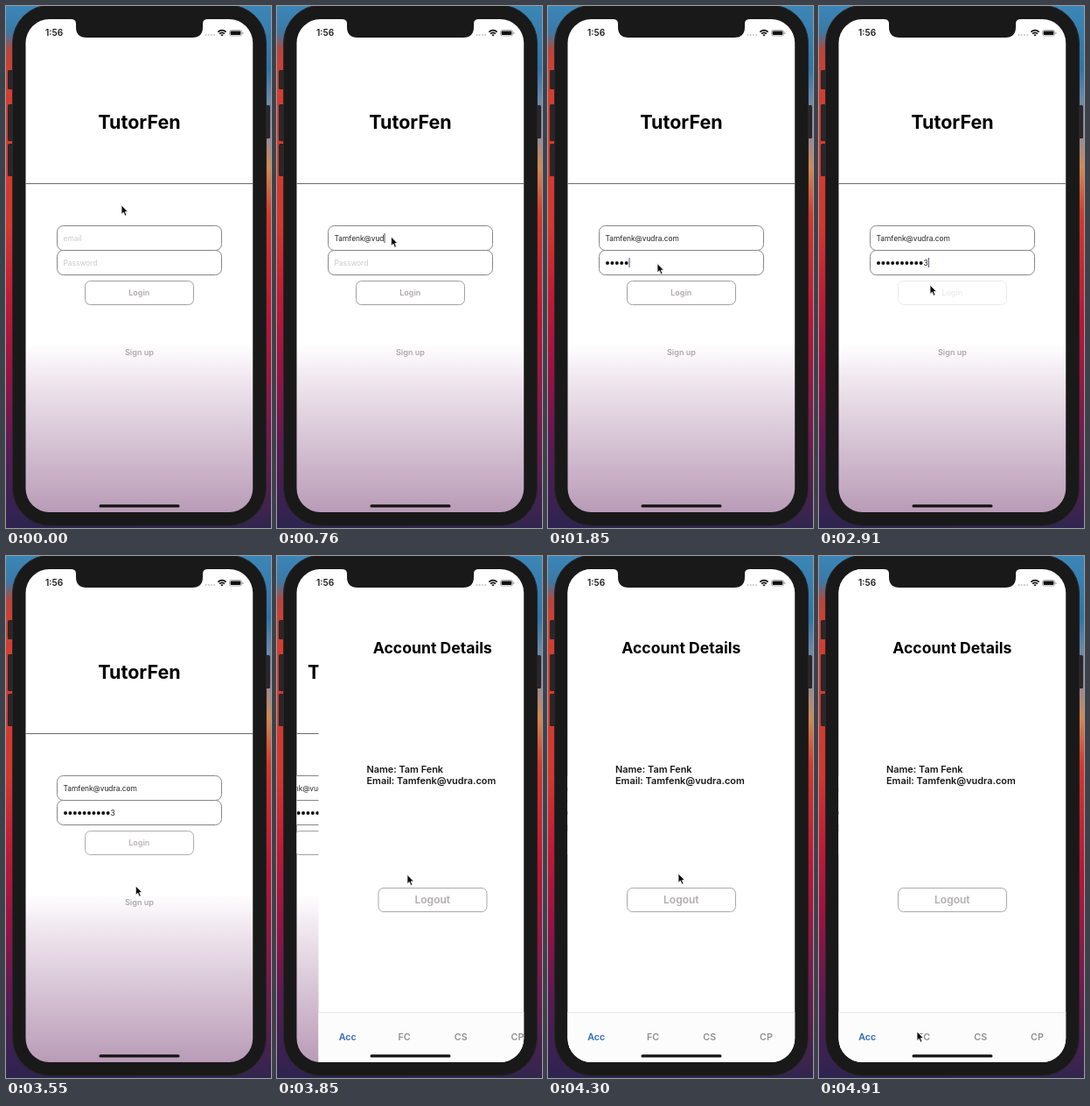
Write an HTML page that moves like this. It is 303x595 px and loops after 4940 ms.

```html
<!DOCTYPE html>
<html lang="en">
<head>
<meta charset="utf-8">
<title>Login demo</title>
<style>
  html, body { margin: 0; width: 100%; height: 100%; overflow: hidden; background: #191919; }
  svg { display: block; width: 100vw; height: 100vh; font-family: Inter, "Liberation Sans", sans-serif; }
  .b { font-weight: 700; }
  .s { font-weight: 600; }
  .mid { text-anchor: middle; }
  .box { fill: #fff; stroke: #868686; stroke-width: 1; }
  .field { font-size: 8.4px; fill: #222; }
  .hint { font-size: 8.4px; fill: #cbc9cb; }
</style>
</head>
<body>
<svg viewBox="0 0 303 595" preserveAspectRatio="none">
  <defs>
    <linearGradient id="wallL" x2="0" y2="1">
      <stop offset="0" stop-color="#3b86b8"/>
      <stop offset=".05" stop-color="#3a79a6"/>
      <stop offset=".085" stop-color="#b8453c"/>
      <stop offset=".13" stop-color="#d23f30"/>
      <stop offset=".42" stop-color="#d4372e"/>
      <stop offset=".56" stop-color="#c01a36"/>
      <stop offset=".7" stop-color="#9a1243"/>
      <stop offset=".85" stop-color="#581b54"/>
      <stop offset="1" stop-color="#2c2450"/>
    </linearGradient>
    <linearGradient id="wallR" x2="0" y2="1">
      <stop offset="0" stop-color="#3c86b6"/>
      <stop offset=".12" stop-color="#2f74a8"/>
      <stop offset=".18" stop-color="#6b89aa"/>
      <stop offset=".25" stop-color="#97899a"/>
      <stop offset=".31" stop-color="#d28a50"/>
      <stop offset=".4" stop-color="#d6382d"/>
      <stop offset=".6" stop-color="#c01436"/>
      <stop offset=".8" stop-color="#7c1a4d"/>
      <stop offset="1" stop-color="#30264f"/>
    </linearGradient>
    <linearGradient id="mauve" gradientUnits="userSpaceOnUse" x1="0" y1="385" x2="0" y2="577">
      <stop offset="0" stop-color="#fff"/>
      <stop offset=".22" stop-color="#efe6ee"/>
      <stop offset="1" stop-color="#b99bb7"/>
    </linearGradient>
    <clipPath id="screen"><rect x="22.500" y="15" width="259.700" height="562" rx="27"/></clipPath>
  </defs>

  <rect width="152" height="595" fill="url(#wallL)"/>
  <rect x="151" width="152" height="595" fill="url(#wallR)"/>
  <g fill="#2b2629">
    <rect x="2" y="73" width="8" height="22" rx="1.500"/>
    <rect x="2" y="112" width="8" height="42" rx="1.500"/>
    <rect x="2" y="157" width="8" height="37" rx="1.500"/>
    <rect x="294" y="113" width="8" height="38" rx="1.500"/>
  </g>
  <rect x="7.500" y="-1" width="290" height="593.500" rx="43" fill="#191919" stroke="#2a2729"/>

  <g clip-path="url(#screen)">
    <g id="login">
      <rect x="22" y="15" width="261" height="562" fill="url(#mauve)"/>
      <text class="b mid" x="152.500" y="140" font-size="21.500">TutorFen</text>
      <path d="M22 202.500H283" stroke="#6c6c6c"/>
      <rect class="box" x="58.500" y="250.500" width="188" height="28" rx="7"/>
      <rect class="box" x="58.500" y="278.500" width="188" height="28" rx="7"/>
      <text id="mailHint" class="hint" x="65.500" y="268">email</text>
      <text id="mail" class="field" x="65.500" y="268"></text>
      <text id="passHint" class="hint" x="65.500" y="296">Password</text>
      <g id="dots" fill="#111"></g>
      <text id="digit" class="field" x="119.500" y="296">3</text>
      <rect id="caret" width="1" height="11" fill="#4a4f70"/>
      <g id="button">
        <rect class="box" x="90.500" y="313.500" width="124" height="27" rx="6" style="stroke:#a2a0a2"/>
        <text class="s mid" x="152.300" y="330.300" font-size="9" fill="#b0a8ab">Login</text>
      </g>
      <text class="s mid" x="152.500" y="398" font-size="9.100" fill="#b0a7ad">Sign up</text>
    </g>

    <g id="account">
      <rect x="22" y="15" width="261" height="562" fill="#fff"/>
      <text class="b mid" x="152.300" y="111" font-size="17.600">Account Details</text>
      <g class="s" font-size="10.900" fill="#161616">
        <text x="77" y="246.500">Name: Tam Fenk</text>
        <text x="77" y="260">Email: <tspan id="shownMail"></tspan></text>
      </g>
      <rect class="box" x="90.500" y="378.500" width="124" height="27" rx="6" style="stroke:#aaa7a9"/>
      <text class="s mid" x="152.300" y="396.300" font-size="12" fill="#b0acaf">Logout</text>
      <rect x="22" y="520" width="261" height="57" fill="#fcfcfc"/>
      <path d="M22 520.500H283" stroke="#e6e6e6"/>
      <g class="s mid" font-size="10.700" fill="#909092">
        <text x="55.300" y="551.500" fill="#2e68b8">Acc</text>
        <text x="120" y="551.500">FC</text>
        <text x="184.700" y="551.500">CS</text>
        <text x="249.500" y="551.500">CP</text>
      </g>
    </g>

    <path d="M74 14V15Q80 15 80 20V24Q80 36 92 36H213Q225 36 225 24V20Q225 15 231 15V14Z" fill="#191919"/>
    <text class="s" x="45" y="34.300" font-size="10.200" fill="#1c1c1c">1:56</text>
    <g fill="#c4c4c4">
      <circle cx="228.500" cy="33" r="1"/><circle cx="231.700" cy="33" r="1"/>
      <circle cx="234.900" cy="33" r="1"/><circle cx="238.100" cy="33" r="1"/>
    </g>
    <g fill="none" stroke="#111" stroke-width="1.600">
      <path d="M242.300 29.700Q247 25.500 251.700 29.700M244 31.700Q247 29 250 31.700"/>
    </g>
    <path d="M245.300 32.900Q247 31.700 248.700 32.900L247 34.600Z" fill="#111"/>
    <rect x="255.500" y="27.500" width="14" height="6.500" rx="2" fill="none" stroke="#999" stroke-width=".8"/>
    <rect x="256.600" y="28.600" width="11.800" height="4.300" rx="1" fill="#111"/>
    <rect x="270.400" y="29.500" width="1" height="2.500" rx=".5" fill="#999"/>
    <rect x="106.500" y="568.300" width="92" height="3.200" rx="1.600" fill="#141414"/>
  </g>

  <path id="pointer" d="M0 0V10.400L2.400 8.200L4.100 12.200L6 11.400L4.300 7.600H7.500Z"
        fill="#0a0a0a" stroke="#fff" stroke-width=".8" stroke-linejoin="round"/>
</svg>

<script>
const LOOP = 4940;
const MAIL = "Tamfenk@vudra.com";
const PASS_LEN = 11;
const PUSH_AT = 3590;
const WIDTH = 260;
const $ = id => document.getElementById(id);

// Pointer stops: time, x, y
const PATH = [
  [30, 132, 227], [260, 130.500, 263], [1060, 130.500, 263], [1290, 125, 293.500],
  [2560, 125, 293.500], [2780, 127, 318], [3150, 127, 318], [3500, 148.300, 376],
  [3640, 148.300, 376], [3900, 149, 362], [4320, 149, 362], [4860, 112, 542]
];

// Typing stops: time, characters
const MAIL_KEYS = [[350, 0], [750, 11], [1000, 17]];
const PASS_KEYS = [[1420, 0], [1830, 5], [2000, 5], [2600, PASS_LEN]];

const clamp = v => Math.min(1, Math.max(0, v));
const smooth = v => v * v * (3 - 2 * v);
const linear = v => v;

function along(stops, t, ease) {
  let i = 0;
  while (i < stops.length - 2 && t > stops[i + 1][0]) i++;
  const [a, b] = [stops[i], stops[i + 1]];
  const k = ease(clamp((t - a[0]) / (b[0] - a[0])));
  return a.slice(1).map((v, n) => v + (b[n + 1] - v) * k);
}

const typed = (keys, t) => Math.floor(along(keys, t, linear)[0] + 1e-6);
const show = (el, on) => el.setAttribute("visibility", on ? "inherit" : "hidden");
const move = (el, x, y = 0) => el.setAttribute("transform", `translate(${x} ${y})`);

$("shownMail").textContent = MAIL;
const dots = Array.from({ length: PASS_LEN - 1 }, (_, i) => {
  const c = document.createElementNS("http://www.w3.org/2000/svg", "circle");
  c.setAttribute("cx", 68 + i * 5.4);
  c.setAttribute("cy", 293);
  c.setAttribute("r", 2);
  return $("dots").appendChild(c);
});

function drawFields(t) {
  const m = typed(MAIL_KEYS, t), p = typed(PASS_KEYS, t);
  $("mail").textContent = MAIL.slice(0, m);
  show($("mailHint"), m === 0);
  show($("passHint"), p === 0);
  dots.forEach((d, i) => show(d, i < p));
  show($("digit"), p === PASS_LEN);

  const inMail = t < 1310;
  const x = inMail
    ? 65.5 + (m ? $("mail").getComputedTextLength() : 0)
    : 65.5 + p * 5.4;
  move($("caret"), x, inMail ? 259 : 287);
  show($("caret"), t > 290 && t < 3150);
}

function drawButton(t) {
  const fade = t < 2820 ? 1 : t < 3050 ? 0.2 : 0.2 + 0.8 * clamp((t - 3050) / 600);
  $("button").setAttribute("opacity", fade);
}

function drawPush(t) {
  const s = Math.max(0, t - PUSH_AT) * 0.015;
  const left = t > 4250 ? 0 : Math.exp(-s) * (1 + s);
  move($("account"), WIDTH * left);
  move($("login"), -0.3 * WIDTH * (1 - left));
  show($("account"), t >= PUSH_AT);
}

function draw(t) {
  drawFields(t);
  drawButton(t);
  drawPush(t);
  move($("pointer"), ...along(PATH, t, smooth));
}

const start = performance.now();
function tick(now) {
  draw(Math.max(0, now - start) % LOOP);
  requestAnimationFrame(tick);
}
draw(0);
requestAnimationFrame(tick);
</script>
</body>
</html>
```
